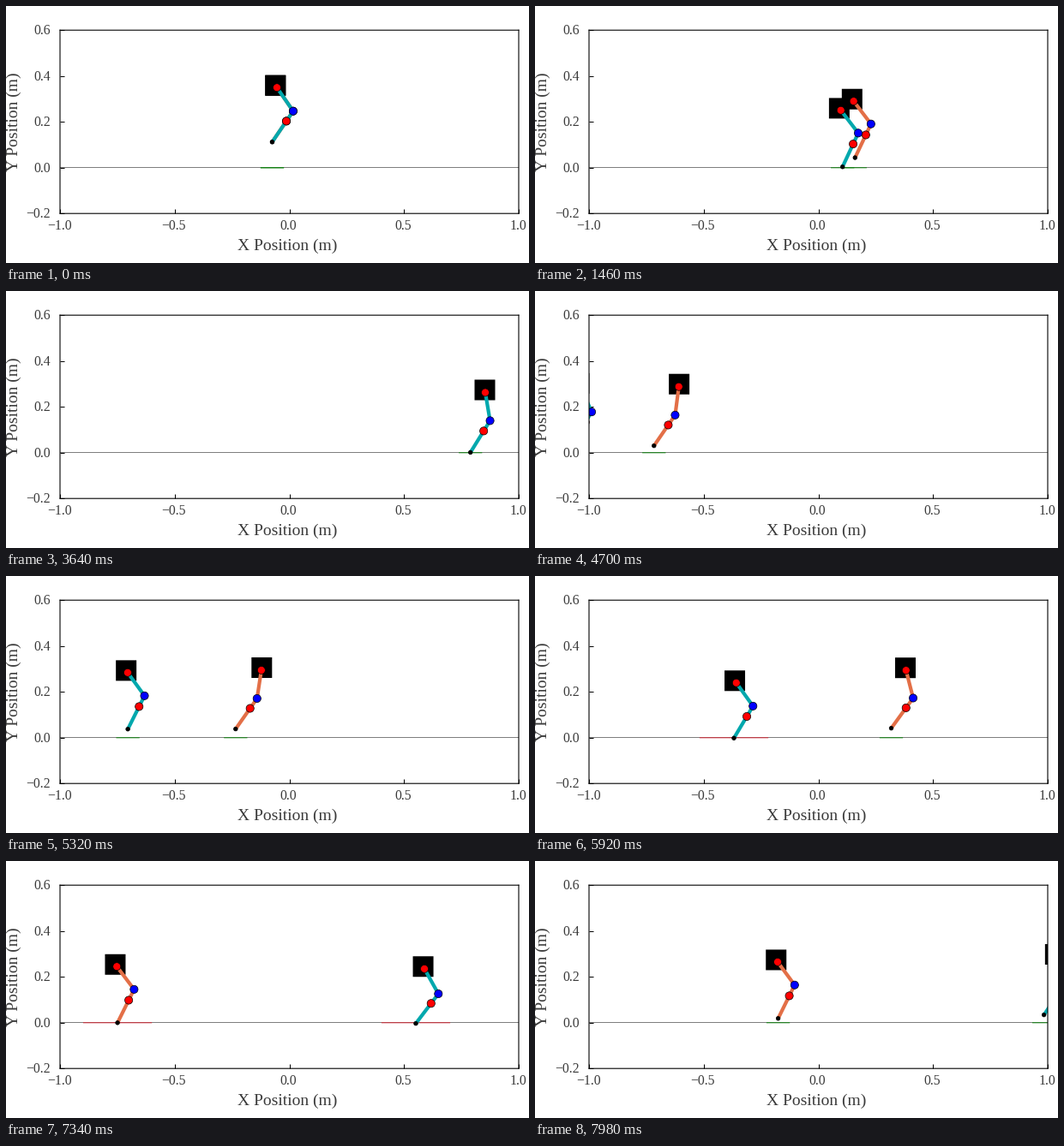
Recreate the animation shown at these times as a matplotlib script. Size 610 by 300 pixels, loop 8 s.

```python
import numpy as np
import matplotlib.pyplot as plt
from matplotlib.animation import FuncAnimation
from matplotlib.patches import Circle, Rectangle

W, H, DPI = 610, 300, 100
FRAMES, STEP = 400, 20
PT = 72 / DPI                  # points per pixel
SCALE = 267.5                  # pixels per metre
LEFT, TOP = 63, 28.2           # corner of the plot area
MID_X, ZERO_Y = LEFT + SCALE, TOP + 0.6 * SCALE
WRAP_LEFT, WRAP = 9.5, 642     # the track repeats from -1.2 m to 1.2 m
THIGH, SHIN, JOINT = 33.4, 43.5, 14.1
GRAVITY, STANCE, LEAD = 900, 0.35, 2
START_HIP, START_FOOT, START_BACK = 93.5, 30, -5.5
BOX, INK = 24, "#3a3a3a"

# Key landings: hop number, time in s, hip x in pixels
TEAL_HOPS = [(0, 0.25, 316), (2, 1.465, 357), (4, 2.5, 440),
             (11, 5.89, 872), (16, 8.2, 1290)]
ORANGE_HOPS = [(0, 0.25, 316), (2, 1.53, 377), (4, 2.78, 511),
               (7, 4.44, 760), (9, 5.65, 1013), (11, 6.64, 1246),
               (15, 8.03, 1579)]


def smooth(s):
    return s * s * (3 - 2 * s)


def ease_out(s):
    return 1 - (1 - s) ** 2


def full_reach(off):
    """Greatest hip height above a foot that is off to the side."""
    return np.sqrt((THIGH + SHIN - 0.3) ** 2 - off ** 2)


class Hopper:
    def __init__(self, ax, color, hops, z):
        count, self.ts, self.xs = np.array(hops, float).T
        self.slopes = np.gradient(self.xs, self.ts)
        self.slopes[0] = 10
        self.landings = np.interp(np.arange(count[-1] + 1), count, self.ts)
        self.landings = np.append(self.landings, self.landings[-1] + 0.5)

        def dot(fill, radius, order):
            return ax.add_patch(Circle((0, 0), radius / SCALE, fc=fill,
                                       ec="black", lw=0.7 * PT,
                                       zorder=z + order))

        self.ground, = ax.plot([], [], lw=1.3 * PT, alpha=0.8, zorder=2,
                               solid_capstyle="butt", snap=False)
        self.body = ax.add_patch(Rectangle((0, 0), BOX / SCALE, BOX / SCALE,
                                           fc="black", lw=0, zorder=z,
                                           snap=False))
        self.leg, = ax.plot([], [], color=color, lw=4.2 * PT, zorder=z + 0.1,
                            solid_joinstyle="round", solid_capstyle="butt")
        self.dots = [dot("red", 4.5, 0.2), dot("blue", 4.6, 0.2),
                     dot("red", 4.6, 0.3), dot("black", 2.3, 0.2)]

    def hip_x(self, t):
        """Cubic Hermite curve through the key landings."""
        ts, xs, m = self.ts, self.xs, self.slopes
        if t < ts[0]:
            return xs[0]
        i = min(np.searchsorted(ts, t, side="right"), len(ts) - 1) - 1
        d = ts[i + 1] - ts[i]
        u = (t - ts[i]) / d
        return (xs[i] + (xs[i + 1] - xs[i]) * smooth(u)
                + d * u * (1 - u) * ((1 - u) * m[i] - u * m[i + 1]))

    def cycle(self, t):
        """Hip height, foot offset, foot height, and whether it stands."""
        marks = self.landings
        if t < marks[0]:
            s = t / marks[0]
            hip = START_HIP - GRAVITY * t * t / 2
            off = START_BACK + (LEAD - START_BACK) * smooth(s)
            return hip, off, hip - (START_HIP - START_FOOT) - 2.5 * s, False
        i = np.searchsorted(marks, t, side="right") - 1
        land, period = marks[i], marks[i + 1] - marks[i]
        foot = self.hip_x(land) + LEAD
        lift = land + STANCE * period
        if t < lift:
            s = (t - land) / (lift - land)
            dip = np.sin(np.pi * s)
            off = foot - self.hip_x(t)
            return min(66 + 4 * s - 5 * dip, full_reach(off)), off, -dip, True
        air = period * (1 - STANCE)
        s = (t - lift) / air
        back = foot - self.hip_x(lift)
        off = back + (LEAD - back) * ease_out(s)
        hip = 70 - 4 * s + GRAVITY / 2 * air ** 2 * s * (1 - s)
        reach = min(70 - 4 * s - 1.5 * np.sin(np.pi * s), full_reach(off))
        return hip, off, hip - reach, False

    def pose(self, t):
        height, off, lift, standing = self.cycle(t)
        x = (self.hip_x(t) - WRAP_LEFT) % WRAP + WRAP_LEFT
        hip, foot = np.array([x, height]), np.array([x + off, lift])

        # Two-link leg with the knee bent forward
        line = foot - hip
        dist = np.hypot(*line)
        unit = line / dist
        along = (THIGH ** 2 - SHIN ** 2 + dist ** 2) / (2 * dist)
        side = np.sqrt(max(THIGH ** 2 - along ** 2, 0))
        knee = hip + along * unit + side * np.array([-unit[1], unit[0]])
        joint = knee + (foot - knee) * JOINT / SHIN
        return hip, knee, joint, foot, standing

    def draw(self, t):
        hip, knee, joint, foot, standing = self.pose(t)
        corner = hip - 0.09 * (knee - hip) - BOX / 2
        pts = np.array([hip, knee, joint, foot, corner])
        pts = (pts - [MID_X, 0]) / SCALE
        self.leg.set_data(pts[:4, 0], pts[:4, 1])
        for d, p in zip(self.dots, pts):
            d.center = p
        self.body.set_xy(pts[4])
        half = 0.15 if standing else 0.051
        self.ground.set_data([pts[3, 0] - half, pts[3, 0] + half], [0, 0])
        self.ground.set_color("#cc2a36" if standing else "#0f800f")


plt.rcParams["font.family"] = "Liberation Serif"
fig = plt.figure(figsize=(W / DPI, H / DPI), dpi=DPI, facecolor="white")
ax = fig.add_axes([LEFT / W, 1 - (TOP + 0.8 * SCALE) / H,
                   2 * SCALE / W, 0.8 * SCALE / H])
x_ticks, y_ticks = np.linspace(-1, 1, 5), np.linspace(-0.2, 0.6, 5)
ax.set(xlim=(-1, 1), ylim=(-0.2, 0.6))
ax.set_xticks(x_ticks, labels=[])
ax.set_yticks(y_ticks, labels=[])
ax.tick_params(direction="in", length=5 * PT, width=1 * PT)
for spine in ax.spines.values():
    spine.set(linewidth=1.1 * PT, zorder=20, snap=False)
ax.axhline(0, color="black", lw=0.5 * PT, zorder=1, snap=False)


def label(x, y, text, px, ha="center", **kw):
    fig.text(x / W, 1 - y / H, text, size=px * PT, ha=ha, va="baseline",
             color=INK, rotation_mode="anchor", **kw)


def number(v):
    return f"{round(v, 1) + 0:.1f}".replace("-", "\u2212")


for v in x_ticks:
    label(MID_X + v * SCALE - 0.9, 261, number(v), 15.7)
for v in y_ticks:
    label(52.2, ZERO_Y + 5.2 - v * SCALE, number(v), 15.7, "right")
label(328.2, 285, "X Position (m)", 19.5)
label(13.5, 135.5, "Y Position (m)", 19.5, rotation=90)

hoppers = [Hopper(ax, "#e36f47", ORANGE_HOPS, 5),
           Hopper(ax, "#00a8ad", TEAL_HOPS, 6)]


def update(i):
    for hopper in hoppers:
        hopper.draw(i * STEP / 1000)
    return []


anim = FuncAnimation(fig, update, frames=FRAMES, interval=STEP,
                     init_func=lambda: update(0), repeat=True, repeat_delay=0)
plt.show()
```
